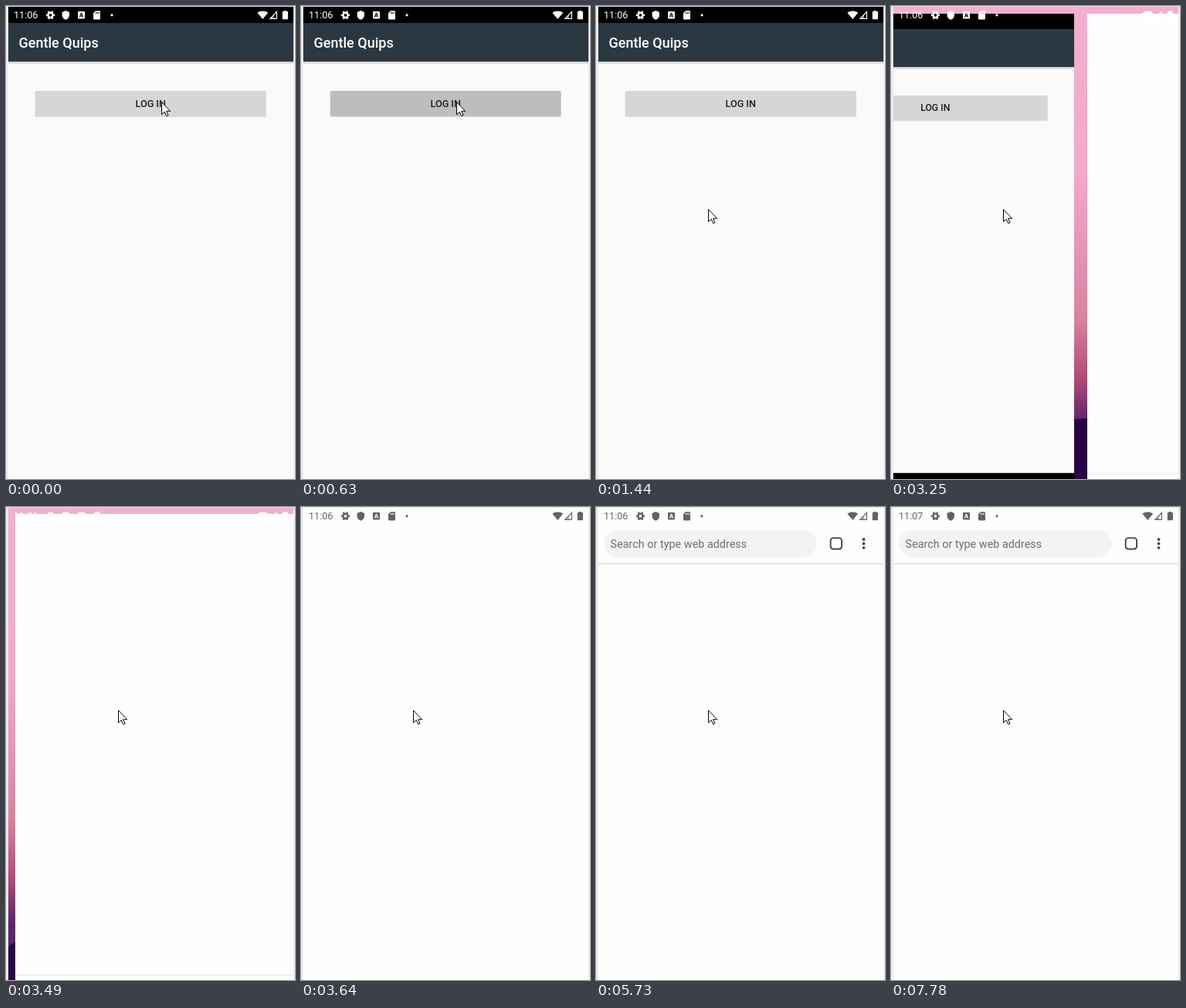
Write an HTML page that moves like this. It is 374 px wide and 613 px high and loops after 8000 ms.

```html
<!DOCTYPE html>
<html lang="en">
<head>
<meta charset="utf-8">
<title>Log in flow</title>
<style>
html, body { margin: 0; width: 100%; height: 100%; overflow: hidden; background: #ececec; }
svg { display: block; width: 374px; height: 613px; font-family: Roboto, sans-serif; }
.anim { animation: 8s step-end infinite; }

.app { animation-name: app; }
.web { animation-name: web; }
.ripple { animation-name: ripple; }
.press { animation-name: press; }
.cursor { animation-name: cursor; }
.status { animation-name: status; }
.toolbar { animation-name: toolbar; }
.before { animation-name: before; }
.after { animation-name: after; }

@keyframes app {
  0% { transform: none; }
  40.625% { transform: translate(-124.8px, 9px) scale(.9726); }
  42.125% { transform: translate(-269.9px, 15.1px) scale(.954); }
  43.625%, 100% { transform: translate(-367.7px, 8.2px) scale(.975); }
}
@keyframes web {
  0% { transform: translate(400px, 0); }
  40.625% { transform: translate(251.1px, 9px) scale(.9726); }
  42.125% { transform: translate(99.1px, 15.1px) scale(.954); }
  43.625% { transform: translate(9.1px, 8.2px) scale(.975); }
  45.5%, 100% { transform: none; }
}
@keyframes press {
  0% { opacity: 0; }
  6.25% { opacity: .05; }
  7.875% { opacity: .12; }
  13.125% { opacity: .06; }
  14.625%, 100% { opacity: 0; }
}
@keyframes ripple {
  0% { opacity: 0; }
  6.25% { opacity: .07; }
  7.875%, 100% { opacity: 0; }
}
@keyframes cursor {
  0% { transform: translate(201px, 124px); }
  13.125% { transform: translate(188px, 151px); }
  14.625% { transform: translate(145px, 230px); }
  16.5% { transform: translate(145px, 252px); }
  18%, 100% { transform: translate(145px, 263px); }
}
@keyframes status {
  0% { color: #fff; }
  45.5%, 100% { color: #636363; }
}
@keyframes toolbar {
  0% { visibility: hidden; }
  71.625%, 100% { visibility: visible; }
}
@keyframes before {
  0% { visibility: visible; }
  97.25%, 100% { visibility: hidden; }
}
@keyframes after {
  0% { visibility: hidden; }
  97.25%, 100% { visibility: visible; }
}
</style>
</head>
<body>
<svg viewBox="0 0 374 613">
  <defs>
    <clipPath id="screen"><rect x="3" y="1" width="369" height="612"/></clipPath>
    <clipPath id="button"><rect x="38" y="110" width="298.5" height="33" rx="1.8"/></clipPath>
    <linearGradient id="sky" gradientUnits="userSpaceOnUse" x1="0" y1="0" x2="0" y2="540">
      <stop offset="0" stop-color="#f2afd0"/>
      <stop offset=".4" stop-color="#f6a8c5"/>
      <stop offset=".58" stop-color="#e694b8"/>
      <stop offset=".75" stop-color="#d9829f"/>
      <stop offset=".89" stop-color="#b64a7c"/>
      <stop offset="1" stop-color="#5b2569"/>
    </linearGradient>
    <linearGradient id="shade" x1="0" y1="0" x2="0" y2="1">
      <stop offset="0" stop-opacity=".2"/>
      <stop offset="1" stop-opacity="0"/>
    </linearGradient>
  </defs>

  <rect width="374" height="613" fill="#ececec"/>
  <rect width="374" height="1" fill="#e0e0e0"/>

  <g clip-path="url(#screen)">
    <!-- wallpaper -->
    <rect x="3" y="1" width="369" height="612" fill="url(#sky)"/>
    <path d="M3 570C50 535 85 518 110 518C150 520 190 540 237 536L254 534L372 505V613H3Z" fill="#290445"/>

    <!-- login screen -->
    <g class="anim app">
      <rect x="3" y="1" width="369" height="656" fill="#fafafa"/>
      <rect x="3" y="1" width="369" height="21.3"/>
      <rect x="3" y="22" width="369" height="50" fill="#2c3841"/>
      <rect x="3" y="72" width="369" height="4" fill="url(#shade)"/>
      <rect x="3" y="613" width="369" height="44"/>
      <text x="16.6" y="54.3" font-size="18" font-weight="500" fill="#fff">Gentle Quips</text>
      <rect x="37.5" y="110.2" width="299.5" height="34" rx="2" opacity=".1"/>
      <g clip-path="url(#button)">
        <rect x="38" y="110" width="298.5" height="33" fill="#d5d7d6"/>
        <rect class="anim press" x="38" y="110" width="298.5" height="33"/>
        <circle class="anim ripple" cx="197" cy="126" r="95"/>
      </g>
      <text x="187.2" y="131" font-size="12.6" font-weight="500" fill="#1d1d1d" text-anchor="middle">LOG IN</text>
    </g>

    <!-- browser -->
    <g class="anim web">
      <rect x="3" y="1" width="369" height="656" fill="#fefefe"/>
      <rect x="3" y="613.2" width="369" height="1" fill="#dedede"/>
      <g class="anim toolbar">
        <rect x="10" y="29.7" width="275.5" height="35.6" rx="17.8" fill="#f1f3f4"/>
        <text x="18.6" y="53" font-size="14.4" fill="#6c6f73">Search or type web address</text>
        <rect x="303.6" y="40.1" width="14.4" height="14.4" rx="3.4" fill="none" stroke="#45484c" stroke-width="1.9"/>
        <g fill="#45484c">
          <circle cx="346.5" cy="42" r="1.9"/>
          <circle cx="346.5" cy="47.4" r="1.9"/>
          <circle cx="346.5" cy="52.8" r="1.9"/>
        </g>
        <rect x="3" y="72" width="369" height="3" fill="#e9e9e9"/>
      </g>
    </g>

    <!-- status bar -->
    <g class="anim status" fill="currentColor">
      <g font-size="12.6">
        <text class="anim before" x="10" y="16.4">11:06</text>
        <text class="anim after" x="10" y="16.4">11:07</text>
      </g>
      <g fill="none" stroke="currentColor">
        <circle cx="57.5" cy="11.8" r="3.1" stroke-width="2.5"/>
        <circle cx="57.5" cy="11.8" r="4.8" stroke-width="1.7" pathLength="12" stroke-dasharray="1 1" stroke-dashoffset=".5"/>
      </g>
      <path d="M77.3 6L82 8V11.5C82 14.5 80 17 77.3 17.8C74.6 17 72.6 14.5 72.6 11.5V8Z"/>
      <path fill-rule="evenodd" d="M94 7H101A1 1 0 0 1 102 8V15.5A1 1 0 0 1 101 16.5H94A1 1 0 0 1 93 15.5V8A1 1 0 0 1 94 7ZM96.9 8.8L94.8 14.6H96L96.4 13.4H98.6L99 14.6H100.2L98.1 8.8ZM97.5 10.2L98.2 12.4H96.8Z"/>
      <path fill-rule="evenodd" d="M116 6.2H121A1 1 0 0 1 122 7.2V16.5A1 1 0 0 1 121 17.5H114A1 1 0 0 1 113 16.5V9.2ZM116 8V10H117V8ZM117.8 8V10H118.8V8ZM119.6 8V10H120.6V8Z"/>
      <circle cx="137" cy="11.8" r="1.6"/>
      <path d="M325.3 8.7C329 5.6 335.4 5.6 339.1 8.7L332.2 17Z"/>
      <path d="M350.3 7.6V16.4H341.8Z" fill="none" stroke="currentColor" stroke-width="1.2"/>
      <path d="M347 11V16.4H341.8Z" opacity=".45"/>
      <path d="M359.7 6H362.7V7.1H364.2A.7 .7 0 0 1 364.9 7.8V16.5A.7 .7 0 0 1 364.2 17.2H358.4A.7 .7 0 0 1 357.7 16.5V7.8A.7 .7 0 0 1 358.4 7.1H359.7Z"/>
    </g>
  </g>

  <path class="anim cursor" d="M.5 .7V16.6L4.2 13.2L6.7 18.6L9 17.6L6.6 12.3H11.7Z" fill="#fff" stroke="#000" stroke-width="1"/>
</svg>
</body>
</html>
```
